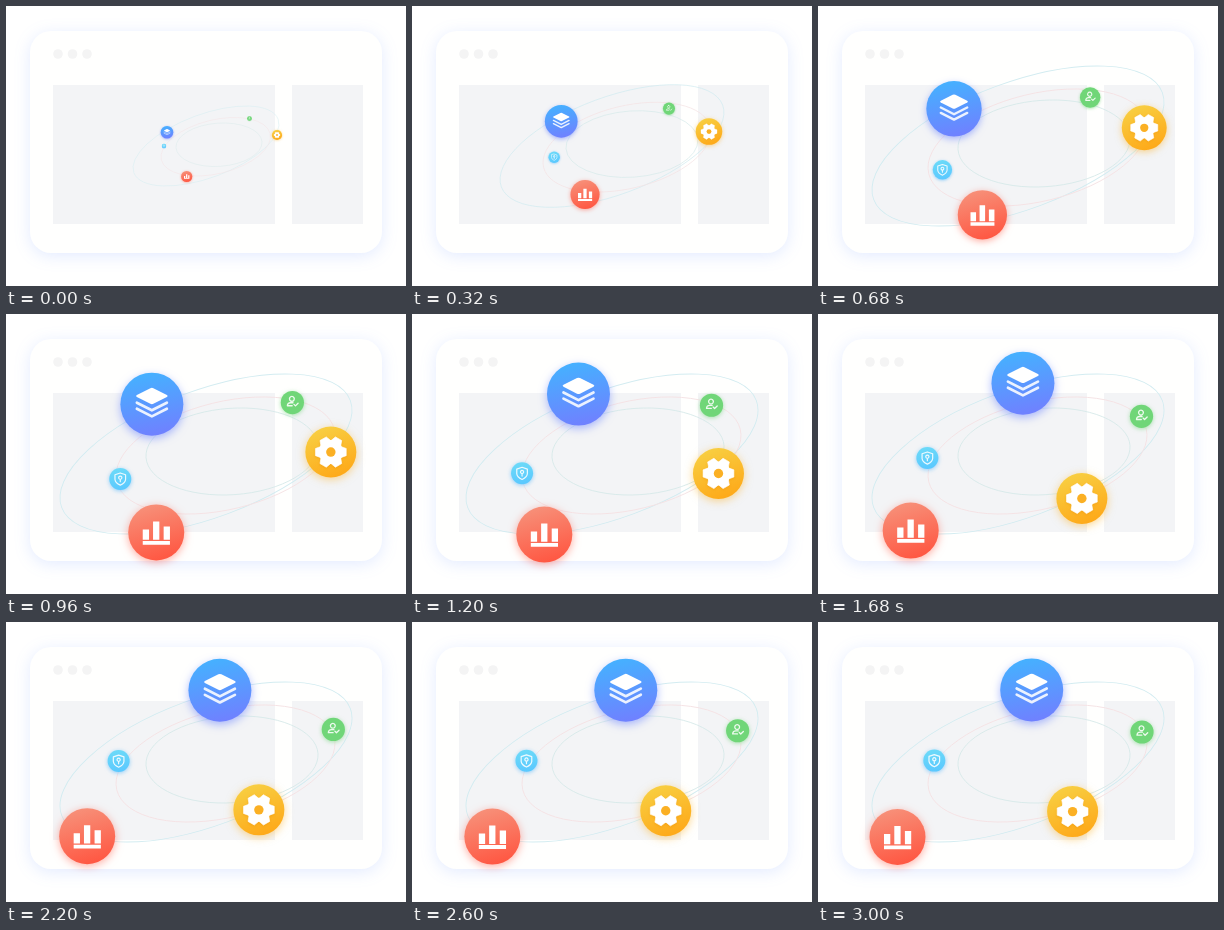
These frames come from a looping animation (400x280 px, 5 s). An HTML page:

```html
<!DOCTYPE html>
<html lang="en">
<head>
<meta charset="utf-8">
<title>Orbiting tools</title>
<style>
  html, body { margin: 0; width: 100%; height: 100%; overflow: hidden; background: #fff; }
  svg { display: block; width: 100%; height: 100%; }
  .card { fill: #fffffe; filter: drop-shadow(0 3px 8px rgba(70, 120, 255, .15)); }
  .dots { fill: #f4f4f4; }
  .panels { fill: #f3f4f6; }
  #orbits { fill: none; stroke-width: .9; }
  .white { fill: #fff; }
  .line { fill: none; stroke: #fff; stroke-linecap: round; stroke-linejoin: round; }
  .soft { opacity: .88; }
  #layers > circle { fill: url(#blue); filter: drop-shadow(0 3px 4.5px rgba(92, 120, 255, .5)); }
  #chart > circle { fill: url(#red); filter: drop-shadow(0 2px 4px rgba(255, 90, 70, .5)); }
  #gear > circle { fill: url(#gold); filter: drop-shadow(0 2px 4px rgba(250, 175, 35, .5)); }
  #gear > g { filter: drop-shadow(0 1px 1px rgba(235, 140, 0, .4)); }
  #user > circle { fill: #70d678; filter: drop-shadow(0 1px 2px rgba(90, 205, 100, .5)); }
  #shield > circle { fill: url(#cyan); filter: drop-shadow(0 1px 2px rgba(80, 180, 250, .6)); }
</style>
</head>
<body>
<svg viewBox="0 0 400 280">
  <defs>
    <linearGradient id="blue" x1=".4" y1="0" x2=".6" y2="1">
      <stop stop-color="#45b1ff"/><stop offset="1" stop-color="#7080ff"/>
    </linearGradient>
    <linearGradient id="red" x1=".35" y1="0" x2=".65" y2="1">
      <stop stop-color="#f79079"/><stop offset="1" stop-color="#ff5641"/>
    </linearGradient>
    <linearGradient id="gold" x1=".3" y1="0" x2=".7" y2="1">
      <stop stop-color="#f8cf42"/><stop offset="1" stop-color="#fea818"/>
    </linearGradient>
    <linearGradient id="cyan" x1=".4" y1="0" x2=".6" y2="1">
      <stop stop-color="#6cdaf8"/><stop offset="1" stop-color="#5ac8ff"/>
    </linearGradient>
    <path id="teeth" d="M-10-5.6L-15.4-3.6V3.6L-10 5.6H10L15.4 3.6V-3.6L10-5.6Z"
      stroke="#fff" stroke-width=".6" stroke-linejoin="round"/>
  </defs>

  <rect class="card" x="24" y="25" width="352" height="222" rx="21"/>
  <g class="dots">
    <circle cx="52" cy="48" r="4.8"/><circle cx="66.5" cy="48" r="4.8"/><circle cx="81" cy="48" r="4.8"/>
  </g>
  <g class="panels">
    <rect x="47" y="79" width="222" height="139"/><rect x="286" y="79" width="71" height="139"/>
  </g>

  <g id="orbits">
    <ellipse rx="153.9" ry="63.5" transform="rotate(-20.3)" stroke="#d3ecf1"/>
    <ellipse rx="111.9" ry="53.8" transform="translate(19.5 1.5) rotate(-13.6)" stroke="#f5e3e5"/>
    <ellipse rx="86.2" ry="43.2" transform="translate(26 -2.5) rotate(-4)" stroke="#d7eaea"/>
  </g>

  <g id="layers">
    <circle r="31.5"/>
    <path class="white" d="M-1.5-16Q0-16.7 1.5-16L15-9.2Q16.8-8.2 15-7.2L1.5-.4Q0 .3-1.5-.4L-15-7.2Q-16.8-8.2-15-9.2Z"/>
    <path class="line soft" stroke-width="2.7" d="M-15-1.5L0 6.1L15-1.5M-15 4.6L0 12.2L15 4.6"/>
  </g>
  <g id="chart">
    <circle r="28"/>
    <path class="white" d="M-13.5-3h6.3V7.3h-6.3ZM-3.2-11h6.3V7.3h-6.3ZM7.4-6h6.3V7.3h-6.3ZM-13.5 8.5h27.2v3.8h-27.2Z"/>
  </g>
  <g id="gear">
    <circle r="25.5"/>
    <g class="white">
      <circle r="12"/>
      <use href="#teeth"/><use href="#teeth" transform="rotate(60)"/><use href="#teeth" transform="rotate(120)"/>
    </g>
    <path fill="#fbb024" d="M-4.7 0a4.7 4.7 0 1 1 9.4 0a4.7 4.7 0 1 1-9.4 0Z"/>
  </g>
  <g id="user">
    <circle r="11.6"/>
    <path class="line soft" stroke-width="1.3" d="M-.5-6.1a2.4 2.4 0 1 1-.01 0ZM.6.2H-1.8Q-5 .2-5 3.2H-.2M1.6 1.8L3.1 3.3L5.7.7"/>
  </g>
  <g id="shield">
    <circle r="11"/>
    <g class="line soft" stroke-width="1.2">
      <path d="M0-6L5.3-4.2V.5Q5 4 0 6.2Q-5 4-5.3.5V-4.2Z"/>
      <path d="M0-2.9a1.6 1.6 0 1 1-.01 0ZM0 .4V2.8"/>
    </g>
  </g>
</svg>
<script>
  const LOOP = 5000, STEP = 40;
  const OPENED = 600, LAUNCHED = 800, ORBITED = 1800, SETTLED = 3000;

  // Each ball flies straight out, follows one bend of its orbit, then drifts to rest.
  const routes = {
    layers: { from: [161, 126.3], out: [131.6, 98.7], bend: [176.8, 69.9], end: [214, 68.4], rest: [213.7, 68] },
    chart: { from: [180.7, 170.5], out: [161.5, 215.6], bend: [127.2, 226.5], end: [82, 213.8], rest: [79.5, 215] },
    gear: { from: [271, 129], out: [336, 120.5], bend: [302.5, 179.5], end: [252, 187], rest: [254.6, 189.6] },
    user: { from: [243.5, 112.5], out: [277.2, 87.8], bend: [306.4, 88.9], end: [329, 106.2], rest: [324, 110] },
    shield: { from: [158, 140], out: [118.5, 168], bend: [103.5, 159.4], end: [110.8, 139.3], rest: [116.3, 138.6] }
  };

  const byId = id => document.getElementById(id);
  const progress = (t, start, end) => Math.min(1, Math.max(0, (t - start) / (end - start)));
  const mix = (a, b, k) => a + (b - a) * k;
  const mixPoints = (p, q, k) => p.map((v, axis) => mix(v, q[axis], k));

  function place({ from, out, bend, end, rest }, t) {
    if (t < LAUNCHED) return mixPoints(from, out, progress(t, 0, LAUNCHED));
    if (t > ORBITED) return mixPoints(end, rest, progress(t, ORBITED, SETTLED));
    const k = progress(t, LAUNCHED, ORBITED);
    return mixPoints(mixPoints(out, bend, k), mixPoints(bend, end, k), k);
  }

  function draw(t) {
    const spread = mix(.5, 1, progress(t, 0, OPENED));
    byId("orbits").setAttribute("transform", `translate(200 140) scale(${spread})`);

    const size = mix(.2, 1, progress(t, 0, LAUNCHED));
    for (const [id, route] of Object.entries(routes)) {
      byId(id).setAttribute("transform", `translate(${place(route, t)}) scale(${size})`);
    }
  }

  const start = performance.now();
  function tick() {
    const t = (performance.now() - start) % LOOP;
    draw(Math.min(SETTLED, Math.floor(t / STEP) * STEP));
    requestAnimationFrame(tick);
  }
  tick();
</script>
</body>
</html>
```
